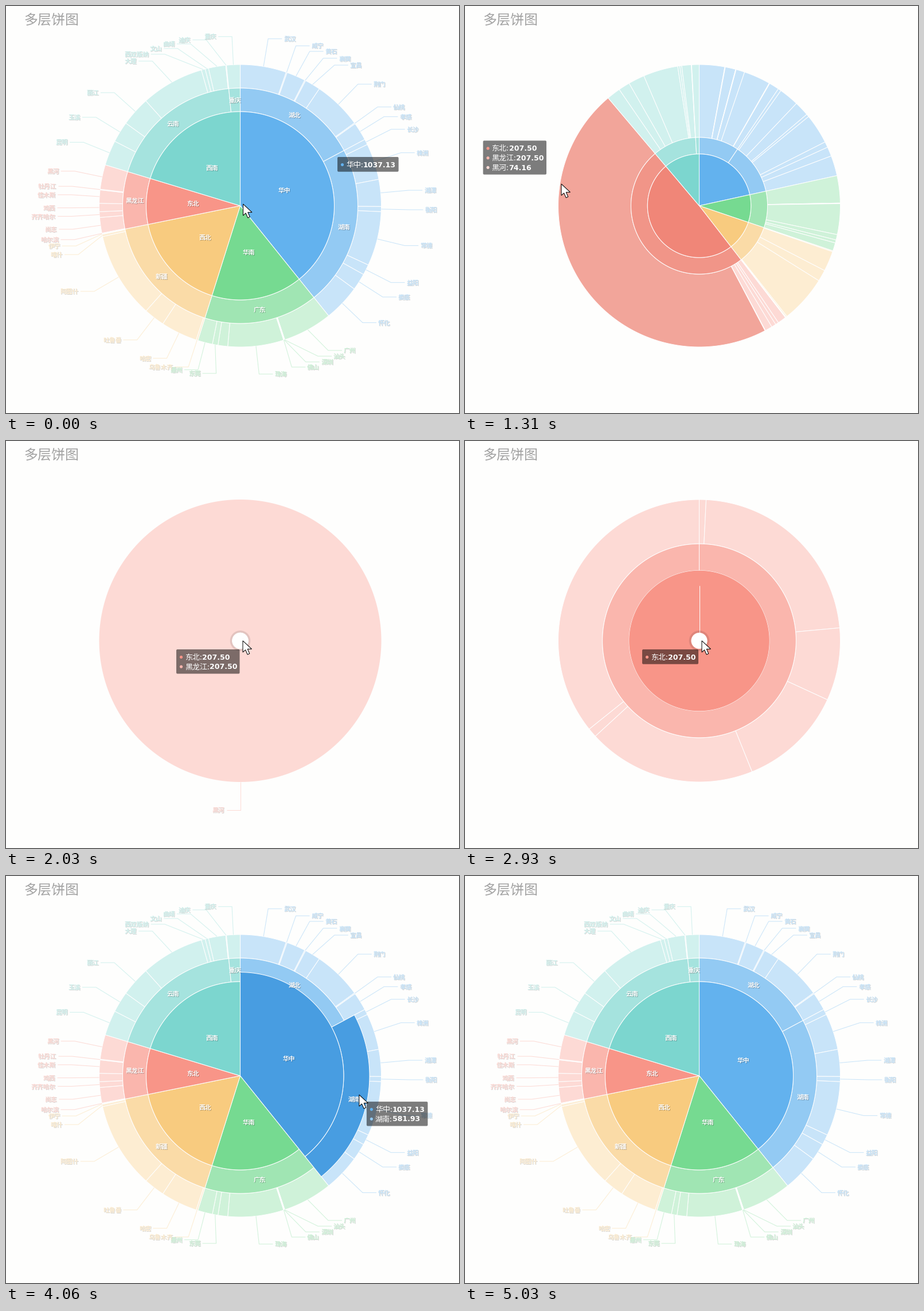
Write a matplotlib script that moves like this. It is 790 px wide and 709 px high and loops after 5.27 s.

```python
import numpy as np
import matplotlib.pyplot as plt
from matplotlib.animation import FuncAnimation
from matplotlib.collections import LineCollection, PolyCollection
from matplotlib.colors import to_rgb
from matplotlib.patches import Circle, FancyBboxPatch, Polygon

W, H, DPI = 790, 709, 100
PX = 72 / DPI
CX, CY, RADIUS = 408.5, 348, 246
LABEL_RADIUS = 295
LOOP, STEP, ZOOM = 5270, 34, 500
BACKGROUND = "#fefefd"
CJK = "Noto Sans CJK JP"

# region, colour, hover colour, branches; each leaf carries its end angle
TREE = [
    ("华中", "#63b2ee", "#489de1", [
        ("湖北", [("武汉", 19), ("咸宁", 19.4), ("黄石", 27.2), ("襄樊", 27.6),
                ("宜昌", 34.1), ("荆门", 54.1), ("仙桃", 54.5), ("孝感", 62)]),
        ("湖南", [("长沙", 64.3), ("株洲", 79.2), ("湘潭", 90.3), ("衡阳", 92.4),
                ("常德", 114.8), ("益阳", 119.1), ("娄底", 126.1), ("怀化", 141.2)])]),
    ("华南", "#76da91", "#5cc87a", [
        ("广东", [("广州", 161.6), ("汕头", 161.75), ("深圳", 161.9), ("佛山", 162.1),
                ("珠海", 185.1), ("", 189.1), ("东莞", 191.4), ("惠州", 197.5)])]),
    ("西北", "#f8cb7f", "#eab763", [
        ("新疆", [("乌鲁木齐", 198.2), ("哈密", 213.3), ("吐鲁番", 221.9),
                ("阿图什", 257.4), ("喀什", 258.3), ("伊宁", 258.6)])]),
    ("东北", "#f89588", "#ea7a6a", [
        ("黑龙江", [("哈尔滨", 258.82), ("尚志", 265.25), ("齐齐哈尔", 267.6),
                 ("鸡西", 271), ("佳木斯", 276.45), ("牡丹江", 276.75), ("黑河", 286.85)])]),
    ("西南", "#7cd6cf", "#60c3bb", [
        ("云南", [("昆明", 297.2), ("玉溪", 305.8), ("丽江", 318), ("大理", 344),
                ("西双版纳", 345.6), ("文山", 347), ("曲靖", 354.1), ("迪庆", 354.4)]),
        ("重庆", [("重庆", 360)])]),
]

# heights of the labels that are pushed apart in the full view
NUDGED = {"黄石": 79, "襄樊": 91, "宜昌": 103, "广州": 600, "汕头": 610, "深圳": 620,
          "佛山": 629, "东莞": 640, "喀什": 433, "伊宁": 418, "哈尔滨": 407, "大理": 96,
          "西双版纳": 84, "文山": 74, "曲靖": 66, "迪庆": 59}

VALUES = {"华中": "1037.13", "湖南": "581.93", "东北": "207.50",
          "黑龙江": "207.50", "黑河": "74.16"}

# focus angles and ring radii of every zoom level
VIEWS = {
    "root": (0, 360, (0, 164, 205, RADIUS)),
    "region": (258.6, 286.85, (14, 164, 205, RADIUS)),
    "branch": (258.6, 286.85, (0, 14, 75, RADIUS)),
    "leaf": (276.75, 286.85, (0, 0, 14, RADIUS)),
}
ZOOMS = [(1084, "leaf"), (2080, "branch"), (2580, "region"), (3235, "root")]

# name, enter, leave, fade-out time
HOVERS = [
    ("华中", 170, 240, 100), ("东北", 250, 1084, ZOOM), ("黑龙江", 430, 1084, ZOOM),
    ("黑河", 720, 1084, ZOOM), ("黑河", 1670, 1920, 80),
    ("华中", 3790, 4420, 100), ("湖南", 3930, 4380, 100),
    ("东北", 4480, 4630, 100), ("黑龙江", 4530, 4610, 80),
    ("华中", 4670, 4900, 100), ("湖南", 4740, 4890, 100),
]

TIPS = [(0, "华中"), (250, "东北"), (430, "东北 黑龙江"), (740, "东北 黑龙江 黑河"),
        (1940, "东北 黑龙江"), (2080, "东北"), (3235, ""), (3790, "华中"),
        (3940, "华中 湖南"), (4400, "华中"), (4490, "东北"), (4530, "东北 黑龙江"),
        (4620, "东北"), (4670, "华中"), (4740, "华中 湖南"), (4900, "")]

CURSOR_PATH = np.array([
    (0, 413.5, 345), (170, 413.5, 345), (595, 193, 309), (680, 181, 309),
    (720, 181, 309), (820, 168, 310), (1630, 168, 310), (1980, 413, 348),
    (3770, 413, 348), (4055, 616, 381), (4320, 612, 384), (4570, 215, 330),
    (4780, 590, 345), (4880, 612, 260), (5000, 640, -40), (LOOP, 640, -40)])
TIP_PATH = np.array([
    (0, 578, 263), (170, 578, 263), (270, 400, 305), (595, 71, 295), (680, 55, 295),
    (720, 55, 295), (820, 31.5, 234.5), (1640, 31.5, 234.5), (1980, 297, 363),
    (2079, 297, 363), (2080, 309, 363), (LOOP, 309, 363)])


class Node:
    def __init__(self, name, level, start, end, color, hot):
        self.name, self.level = name, level
        self.start, self.end = start, end
        alpha = (1, 0.69, 0.35)[level]
        self.color = mix(to_rgb("white"), to_rgb(color), alpha)
        self.hot = to_rgb(hot)


def mix(a, b, t):
    return tuple((1 - t) * np.array(a) + t * np.array(b))


def ramp(t, start, length):
    return min(max((t - start) / length, 0), 1)


def polar(r, deg):
    a = np.radians(deg)
    return np.stack([CX + r * np.sin(a), CY - r * np.cos(a)], axis=-1)


def along(path, t):
    return np.interp(t, path[:, 0], path[:, 1]), np.interp(t, path[:, 0], path[:, 2])


def build_nodes():
    nodes, angle = [], 0
    for region, color, hot, branches in TREE:
        region_start = angle
        for branch, leaves in branches:
            branch_start = angle
            for leaf, end in leaves:
                nodes.append(Node(leaf, 2, angle, end, color, hot))
                angle = end
            nodes.append(Node(branch, 1, branch_start, angle, color, hot))
        nodes.append(Node(region, 0, region_start, angle, color, hot))
    return nodes


def zoom_at(t):
    view = "root"
    for begin, target in ZOOMS:
        if t < begin:
            break
        if t < begin + ZOOM:
            return view, target, (t - begin) / ZOOM
        view = target
    return view, view, 0


def arc_in(node, view):
    lo, hi, radii = VIEWS[view]
    angles = np.clip((np.array([node.start, node.end]) - lo) / (hi - lo), 0, 1) * 360
    return np.array([*angles, radii[node.level], radii[node.level + 1]])


def hover_amount(name, t):
    return max((ramp(t, enter, 100) * (1 - ramp(t, leave, fade))
                for who, enter, leave, fade in HOVERS if who == name), default=0)


def sector(a0, a1, r0, r1):
    angles = np.linspace(a0, a1, 2 + int((a1 - a0) / 1.5))
    inner = polar(r0, angles[::-1]) if r0 > 0 else [(CX, CY)]
    return np.concatenate([polar(r1, angles), inner])


fig = plt.figure(figsize=(W / DPI, H / DPI), dpi=DPI, facecolor=BACKGROUND)
ax = fig.add_axes([0, 0, 1, 1])
ax.set_xlim(0, W)
ax.set_ylim(H, 0)
ax.axis("off")


def add_text(size, color, z, ha="left", **style):
    style.setdefault("family", CJK)
    return ax.text(0, 0, "", fontsize=size * PX, color=color, zorder=z, ha=ha,
                   va="baseline", **style)


def put(text, x, y, content=None):
    text.set_position((x, y + 0.37 * text.get_fontsize() / PX))
    if content is not None:
        text.set_text(content)


class Label:
    def __init__(self, node):
        white = node.level < 2
        shade = "#00000040" if white else "#00000026"
        color = "white" if white else node.color
        self.texts = [add_text(10.8, shade, 6, weight="bold"),
                      add_text(10.8, color, 7, weight="bold")]
        for text in self.texts:
            text.set_text(node.name)

    def show(self, x, y, ha):
        for text, offset in zip(self.texts, (1, 0)):
            text.set_ha(ha)
            put(text, x + offset, y + offset)
            text.set_visible(True)

    def hide(self):
        for text in self.texts:
            text.set_visible(False)


nodes = build_nodes()
labels = {node: Label(node) for node in nodes}
put(add_text(24, "#a3a3a3", 1), 31, 22.5, "多层饼图")

sectors = PolyCollection([], linewidths=PX, zorder=2)
lines = LineCollection([], linewidths=PX, zorder=3)
ax.add_collection(sectors, autolim=False)
ax.add_collection(lines, autolim=False)

ring = Circle((CX, CY), 16, fill=False, ec="black", alpha=0.1, lw=3.6 * PX, zorder=4)
hole = Circle((CX, CY), 14, fc="white", ec="none", zorder=5)
tip_box = FancyBboxPatch((0, 0), 1, 1, boxstyle="round,pad=0,rounding_size=2",
                         fc="black", ec="none", alpha=0.51, zorder=8)
dots = [Circle((0, 0), 2.6, ec="none", zorder=9) for _ in range(3)]
tip_names = [add_text(13, "white", 9) for _ in range(3)]
tip_values = [add_text(12.5, "white", 9, family="DejaVu Sans", weight="bold")
              for _ in range(3)]
ARROW = np.array([(0, 0), (0, 20), (4.6, 15.8), (8.2, 24), (11.8, 22.4), (8.3, 14.4),
                  (15.5, 14.4)])
cursor = Polygon(ARROW, fc="white", ec="black", lw=PX, zorder=10)
for patch in (ring, hole, tip_box, *dots, cursor):
    ax.add_patch(patch)


def leaf_label(node, mid, view, grow):
    """Place the outer label and return its leader line."""
    radius = LABEL_RADIUS + 12 * grow
    side = 1 if mid < 179.9 else -1
    x, y = polar(radius, mid)
    if view == "root" and node.name in NUDGED:
        y = NUDGED[node.name]
        x = CX + side * np.sqrt(radius ** 2 - (y - CY) ** 2)
    labels[node].show(x + 27 * side, y, "left" if side > 0 else "right")
    return [polar(RADIUS * (1 + 0.1 * grow), mid), (x, y), (x + 24 * side, y)]


def draw_chart(t):
    src, dst, progress = zoom_at(t)
    moving = src != dst
    shapes, leaders, leader_colors = [], [], []
    for node in nodes:
        labels[node].hide()
        a0, a1, r0, r1 = mix(arc_in(node, src), arc_in(node, dst), progress)
        if a1 - a0 < 1e-6 or r1 - r0 < 0.01:
            continue
        tint = hover_amount(node.name, t)
        grow = 0 if moving else tint
        scale = 1 + 0.1 * grow
        full = a1 - a0 > 359.99
        edge = "none" if full and node.level != 1 else "white"
        shapes.append((grow > 0, -node.level, sector(a0, a1, r0 * scale, r1 * scale),
                       mix(node.color, node.hot, tint), edge))
        if full and moving and node.level == 0:
            leaders.append(polar(np.array([14, 0.787 * r1]), np.zeros(2)))
            leader_colors.append("white")
        if moving or not node.name:
            continue
        mid = (a0 + a1) / 2
        if node.level == 2:
            leaders.append(leaf_label(node, mid, src, grow))
            leader_colors.append(node.color)
        elif r1 > 20:
            labels[node].show(*polar((r0 + r1) / 2 * scale, mid), "center")

    shapes.sort(key=lambda s: s[:2])
    sectors.set_verts([s[2] for s in shapes])
    sectors.set_facecolor([s[3] for s in shapes])
    sectors.set_edgecolor([s[4] for s in shapes])
    lines.set_segments(leaders)
    lines.set_color(leader_colors or ["none"])

    zoomed = src != "root" and dst != "root"
    hole.set_visible(zoomed)
    ring.set_visible(zoomed and t > 1940)


def draw_tip(t, pointer):
    rows = [names for begin, names in TIPS if t >= begin][-1].split()
    left, top = along(TIP_PATH, t) if t < 3780 else (pointer[0] + 13, pointer[1] + 12)
    width = 0
    for i, (dot, name, value) in enumerate(zip(dots, tip_names, tip_values)):
        shown = i < len(rows)
        for part in (dot, name, value):
            part.set_visible(shown)
        if not shown:
            continue
        y = top + 13 + 16.7 * i
        key, number = rows[i], VALUES[rows[i]]
        value_x = 20 + 12.5 * len(key)
        node = next(n for n in nodes if n.name == key)
        dot.center = (left + 8.5, y + 0.5)
        dot.set_facecolor(node.color)
        put(name, left + 15, y, key + ":")
        put(value, left + value_x, y, number)
        width = max(width, value_x + 8.6 * (len(number) - 1) + 10)
    tip_box.set_visible(bool(rows))
    tip_box.set_bounds(left, top, width, 9 + 16.7 * len(rows))


def draw(i):
    t = (i + 0.5) * STEP
    pointer = along(CURSOR_PATH, t)
    draw_chart(t)
    draw_tip(t, pointer)
    cursor.set_xy(ARROW + pointer)
    return []


animation = FuncAnimation(fig, draw, frames=LOOP // STEP, interval=STEP,
                          init_func=lambda: [], repeat=True, repeat_delay=0, blit=False)
plt.show()
```
